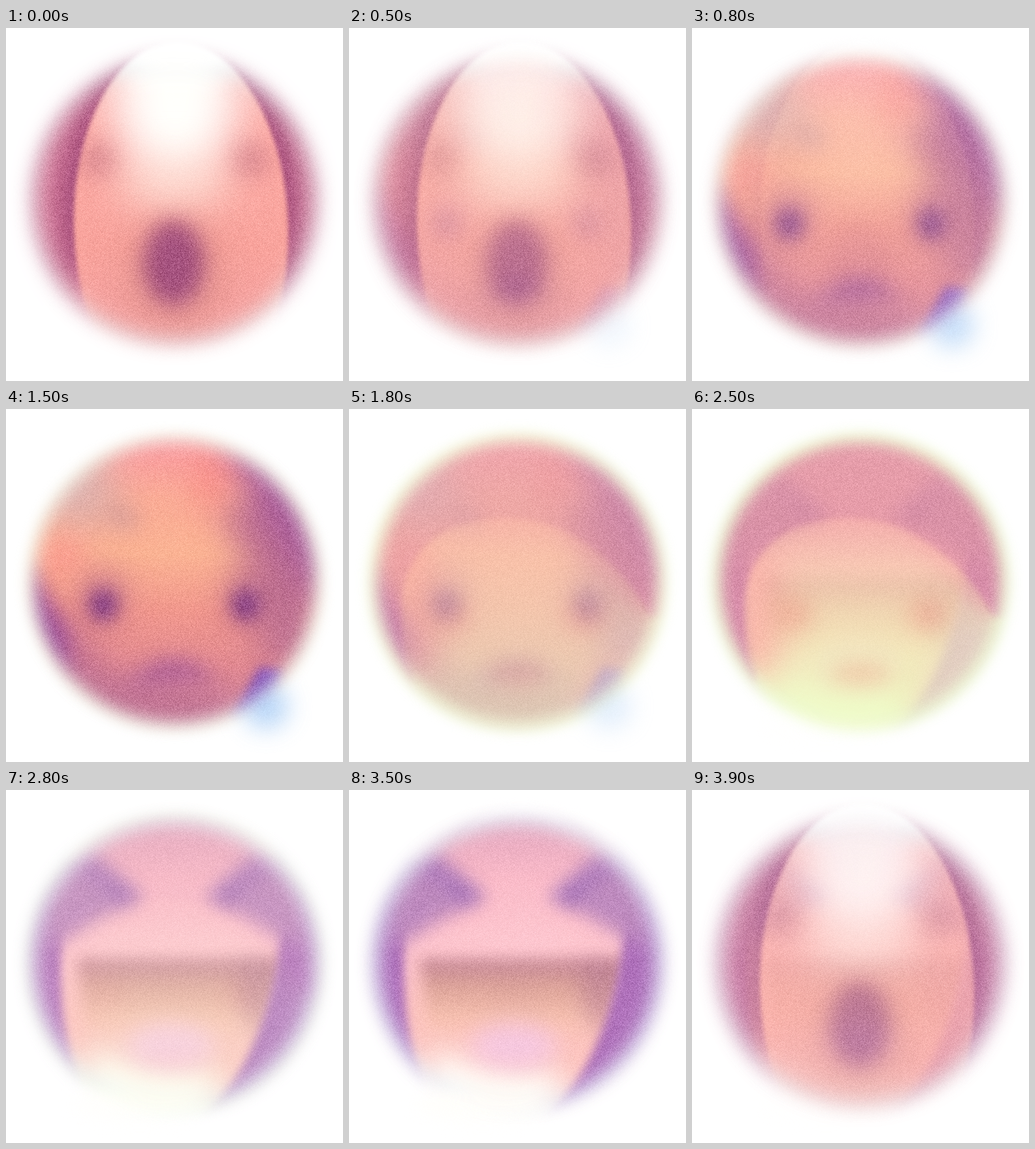
Recreate the animation shown at these times as an HTML page with a canvas. Size 516 by 540 pixels, loop 4000 ms.

```html
<!DOCTYPE html>
<html lang="en">
<head>
<meta charset="utf-8">
<title>Soft faces</title>
<style>
  html, body { margin: 0; width: 100%; height: 100%; overflow: hidden; background: #fff; }
  canvas { position: absolute; left: 0; top: 0; width: 516px; height: 540px; opacity: 0; }
</style>
</head>
<body>
<script>
const W = 516, H = 540, LOOP = 4000, SLOT = 1000, FADE = 500;

function makeCanvas() {
  const c = document.createElement('canvas');
  c.width = W;
  c.height = H;
  return c;
}

const brush = makeCanvas().getContext('2d');

// Vertical gradient with evenly spaced colours.
function lin(top, bottom, ...colors) {
  const g = brush.createLinearGradient(0, top, 0, bottom);
  colors.forEach((c, i) => g.addColorStop(i / (colors.length - 1), c));
  return g;
}

const path = d => new Path2D(d);
const all = path('M0 0H516V540H0Z');
const ball = r => oval(258, 265, r);

function oval(x, y, rx, ry = rx, turn = 0) {
  const p = new Path2D();
  p.ellipse(x, y, rx, ry, turn, 0, Math.PI * 2);
  return p;
}

// A shape together with its mirror image.
function both(shape) {
  const p = new Path2D(shape);
  p.addPath(shape, new DOMMatrix([-1, 0, 0, 1, W, 0]));
  return p;
}

function fill(ctx, [color, blur, shape], mode = 'source-over') {
  ctx.globalCompositeOperation = mode;
  ctx.filter = blur ? `blur(${blur}px)` : 'none';
  ctx.fillStyle = color;
  ctx.fill(shape);
}

// Paints soft shapes, then trims them to a soft outline.
function layer(items, outline, edge) {
  const c = makeCanvas(), ctx = c.getContext('2d');
  for (const item of items) {
    if (item instanceof HTMLCanvasElement) {
      ctx.globalCompositeOperation = 'source-over';
      ctx.filter = 'none';
      ctx.drawImage(item, 0, 0);
    } else fill(ctx, item);
  }
  fill(ctx, ['#000', edge, outline], 'destination-in');
  return c;
}

// Seeded grain, stronger in the darker tones.
function grain(c) {
  const ctx = c.getContext('2d');
  const img = ctx.getImageData(0, 0, W, H), d = img.data;
  let seed = 7;
  const rnd = () => (seed = (Math.imul(seed, 1664525) + 1013904223) >>> 0) / 2 ** 32;
  for (let i = 0; i < d.length; i += 4) {
    const n = (rnd() + rnd() - 1) * (255 - d[i + 1]) * 0.2;
    for (let k = 0; k < 3; k++) d[i + k] += n;
  }
  ctx.putImageData(img, 0, 0);
}

// "under" runs from the nearest shape to the farthest.
function face({ items, edge, under }) {
  const c = layer(items, ball(214), edge);
  under.forEach(u => fill(c.getContext('2d'), u, 'destination-over'));
  grain(c);
  return c;
}

const shout = {
  edge: 17,
  under: [
    ['#fff', 10, oval(264, 40, 75, 30)],
    ['#e6e8ec', 11, ball(220)]
  ],
  items: [
    ['#d67c9a', 0, all],
    ['#a9527e', 17, oval(266, 275, 186, 262)],
    ['#f5a0aa', 30, oval(258, 440, 175, 85)],
    layer([
      [lin(60, 480, '#fdb0ac', '#fdaaa4', '#f9a39c', '#f5a4a4'), 0, all],
      ['#fffffc', 34, oval(260, 95, 96, 140)],
      ['#fffffc', 15, oval(262, 20, 110, 70)],
      ['#ffe4d8b0', 32, oval(258, 240, 90, 40)],
      ['#c87886c0', 18, both(oval(139, 202, 25))],
      ['#d88a8688', 26, oval(257, 380, 80, 90)],
      ['#a4527e', 15, oval(257, 360, 46, 64)]
    ], oval(268, 305, 164, 285, -0.03), 3)
  ]
};

const sad = {
  edge: 13,
  under: [
    ['#a9cdf5', 18, oval(398, 455, 34)],
    ['#eeeee2', 11, ball(223)]
  ],
  items: [
    [lin(50, 480, '#fb8a92', '#fca086', '#fba681', '#ee8478', '#dc727e', '#bd658f'), 0, all],
    ['#fa706cb0', 26, oval(315, 110, 30, 45)],
    ['#d6a6a2', 30, oval(110, 120, 60)],
    ['#c48888c0', 16, oval(178, 165, 28, 16, 0.5)],
    ['#ff807cb0', 20, oval(85, 225, 40, 26)],
    ['#b4587e', 25, path('M325 165L480 60V400L395 395L365 220Z')],
    ['#983f8a', 24, path('M330 50L420 200L480 310L530 200L440 40Z')],
    ['#b4567f', 25, path('M30 310L90 320L160 410L350 450V500H60Z')],
    ['#8a2f85', 15, path('M30 225L95 345V420L20 330Z')],
    ['#a24584', 15, path('M185 425Q250 345 325 415Z')],
    ['#9a3d7890', 24, both(oval(148, 289, 34, 43))],
    ['#6e1c70', 13, both(oval(149, 300, 21, 24))],
    ['#6c30ac', 8, path('M388 395L425 400L420 450L380 495L345 475Z')]
  ]
};

const calm = {
  edge: 10,
  under: [['#eefbc8', 10, ball(228)]],
  items: [
    [lin(50, 300, '#e28c98', '#dc8392', '#dc8296'), 0, all],
    layer([
      [lin(165, 460, '#f09c98', '#f5bea0', '#f2dcac', '#eef0b2', '#e9f9b3'), 0, all],
      ['#f8a294', 28, path('M60 200H130L135 380L60 430Z')],
      ['#f29c96c0', 14, path('M340 160L480 310L455 320Q400 245 330 200Z')],
      ['#ecdeb8', 18, path('M400 330H500V480H330Z')],
      ['#f09a80c8', 18, both(oval(154, 314, 30, 24))],
      ['#ecb482c8', 16, oval(258, 404, 48, 16)]
    ], path('M463 318C420 240 340 166 240 166C150 168 85 210 80 300C80 350 84 385 96 405V540H516V318Z'), 5)
  ]
};

const laugh = {
  edge: 15,
  under: [
    ['#fffefa', 14, oval(205, 480, 100, 25)],
    ['#e2f2fc', 11, ball(224)]
  ],
  items: [
    ['#a058b0', 0, all],
    layer([
      [lin(40, 440, '#dc94b2', '#faaebe', '#ffbec8', '#fdbcb6', '#fdbcb6'), 0, all],
      [lin(250, 400, '#b06682', '#d69488', '#f6b8a4', '#fdbcb600'), 11, path('M108 258H425L390 400H125Z')],
      ['#9c568080', 18, path('M355 265H425L395 375L365 350Z')],
      ['#fffcf6', 22, path('M130 390Q180 425 300 425L335 440L290 540H110Z')],
      ['#f7c2dc', 16, oval(252, 392, 66, 34)]
    ], path('M100 0C90 170 66 320 110 445V540H255C380 460 420 300 424 170L405 0Z'), 7),
    ['#b276b4', 14, both(path('M60 105L135 92L208 165Q150 190 98 225L60 240Z'))],
    ['#8a4ca8a0', 13, both(path('M120 108L208 163L170 182Q160 145 115 128Z'))]
  ]
};

const fade = { easing: 'steps(5, jump-both)' };
const cycle = [
  { offset: 0, opacity: 0, ...fade },
  { offset: FADE / LOOP, opacity: 1 },
  { offset: SLOT / LOOP, opacity: 1, ...fade },
  { offset: (SLOT + FADE) / LOOP, opacity: 0 },
  { offset: 1, opacity: 0 }
];

// Stacking order from back to front, with each face's place in the loop.
const stack = [[shout, 0], [calm, 2], [sad, 1], [laugh, 3]].map(([spec, slot]) => {
  const c = face(spec);
  document.body.append(c);
  return [c, slot];
});

stack.forEach(([c, slot]) => c.animate(cycle, {
  duration: LOOP,
  delay: slot * SLOT - FADE - LOOP,
  iterations: Infinity
}));
</script>
</body>
</html>
```
